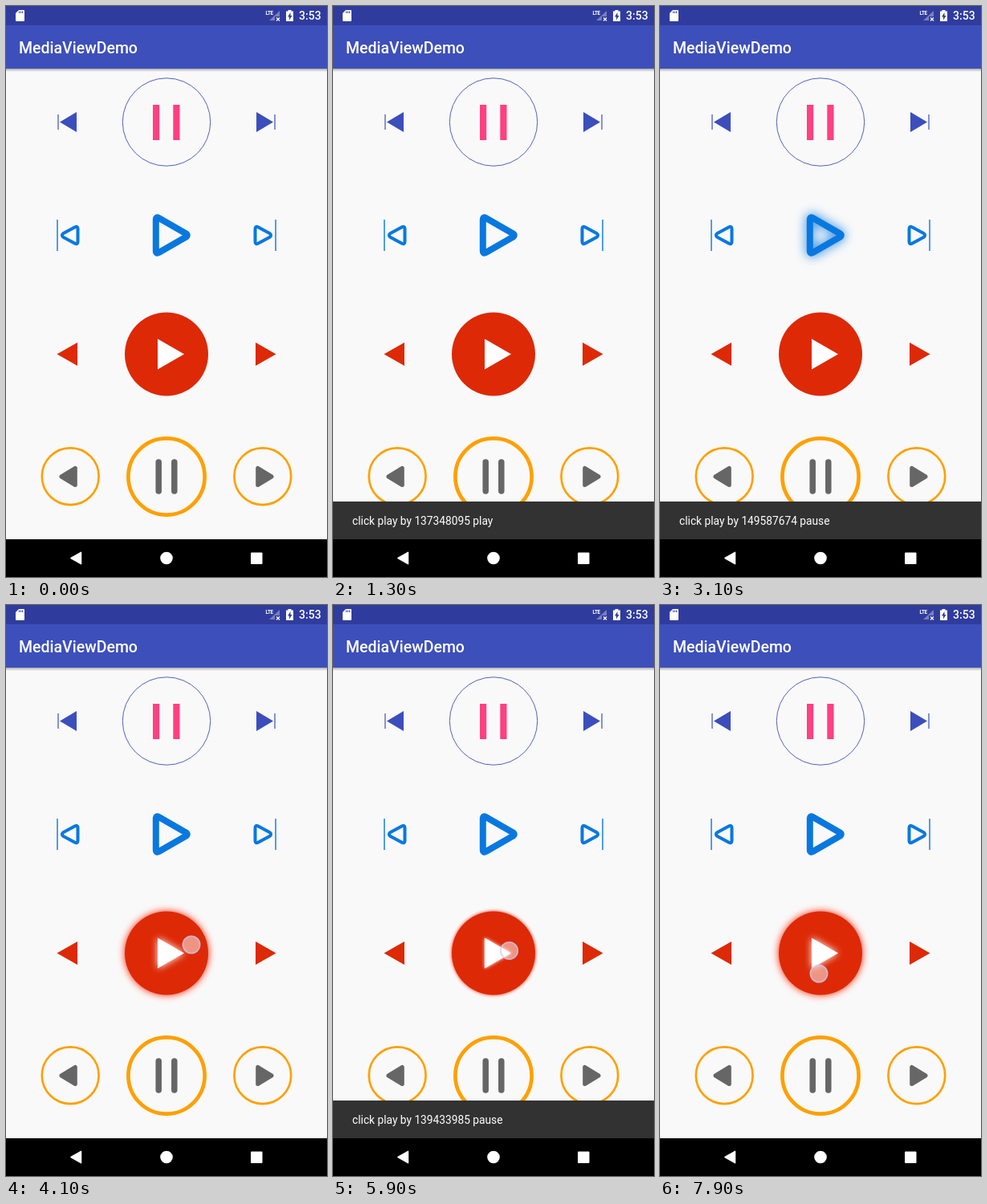
Animation of 400x711 px, one loop 8000 ms. Source, as an HTML page:

```html
<!DOCTYPE html>
<html lang="en">
<head>
<meta charset="utf-8">
<title>MediaViewDemo</title>
<style>
html, body { margin: 0; width: 100%; height: 100%; overflow: hidden; background: #f9f9f9; }
svg { display: block; width: 100vw; height: 100vh; }
text { font-family: Roboto, sans-serif; fill: #fff; }
</style>
</head>
<body>
<svg viewBox="0 0 400 711">
  <defs>
    <linearGradient id="shade" x2="0" y2="1">
      <stop stop-color="#000" stop-opacity=".3"/>
      <stop offset="1" stop-color="#000" stop-opacity="0"/>
    </linearGradient>
    <g id="outlineArrow">
      <path d="M64 266V305" stroke-width="1.4" stroke-linecap="butt"/>
      <path d="M71.200 283.300 86 275.300Q89.500 273.800 89.500 277.500V293.500Q89.500 297.200 86 295.700L71.200 287.700Q68.600 285.500 71.200 283.300Z" stroke-width="4"/>
    </g>
  </defs>
  <rect width="400" height="711" fill="#f9f9f9"/>

  <rect y="24" width="400" height="54" fill="#3d4fba"/>
  <rect width="400" height="24" fill="#303c9d"/>
  <rect y="78" width="400" height="4" fill="url(#shade)"/>
  <text x="16" y="58.5" font-size="19.5" font-weight="500">MediaViewDemo</text>
  <g fill="#fff">
    <path d="M12 9 16 5H22Q23 5 23 6V18Q23 19 22 19H13Q12 19 12 18Z"/>
    <path d="M16.5 6.5V9M18.5 6.5V9M20.5 6.5V9" stroke="#303c9d"/>
    <text x="323.5" y="11" font-size="6.3" font-weight="700" letter-spacing="-.3">LTE</text>
    <path d="M341 6V13H335V18H328Z" fill-opacity=".35"/>
    <path d="M337 14.5 341 18.5M341 14.5 337 18.5" stroke="#fff" stroke-width="1.2"/>
    <path d="M349 6.5H351.5V5H355.5V6.5H358V19H349Z"/>
    <path d="M354.5 8 351 13.5H353V17.5L356.5 12H354.5Z" fill="#303c9d"/>
    <text x="365" y="17.3" font-size="14" font-weight="500">3:53</text>
  </g>

  <g id="top" fill="#ff4081">
    <circle cx="200" cy="144.5" r="54.7" fill="none" stroke="#3f51b5" stroke-width=".9"/>
    <path class="play" d="M189 125V164L222 144.5Z"/>
    <path class="pause" d="M183 123H191.2V167H183ZM208.3 123H216.5V167H208.3Z"/>
  </g>
  <g fill="#3c4ebb">
    <path d="M67 144.5 88 132V157ZM333 144.5 312 132V157Z"/>
    <path d="M65 135V154M335 135V154" stroke="#3c4ebb" stroke-width="1.2"/>
  </g>

  <g fill="none" stroke="#0878e0" stroke-linejoin="round" stroke-linecap="round">
    <use href="#outlineArrow"/>
    <use href="#outlineArrow" transform="matrix(-1 0 0 1 400 0)"/>
    <g id="blue" stroke-width="8">
      <path class="play" d="M186.8 266.5Q186.800 262 190.500 264L224 283.200Q227.500 285.500 224 287.800L190.500 307Q186.800 309 186.800 304.500Z"/>
      <path class="pause" d="M185.700 265V306M214.300 265V306"/>
    </g>
  </g>

  <path d="M63.5 433.5 89 419V448ZM336.5 433.5 311 419V448Z" fill="#dd2906"/>
  <circle id="disc" cx="200" cy="433.5" r="52" fill="#dd2906"/>
  <g id="red" fill="#fff">
    <path class="play" d="M189 414.5V452.5L222 433.5Z"/>
    <path class="pause" d="M186 413H193.5V454H186ZM206.5 413H214V454H206.5Z"/>
  </g>

  <g fill="none" stroke="#ffa000" stroke-width="2.7">
    <circle cx="80.2" cy="585.7" r="35.4"/>
    <circle cx="319.8" cy="585.7" r="35.4"/>
    <circle cx="200" cy="586" r="47.6" stroke-width="4.7"/>
  </g>
  <g fill="#666" stroke="#666" stroke-linejoin="round" stroke-linecap="round">
    <path d="M69 586 86.3 575.5V596.5ZM331 586 313.7 575.5V596.5Z" stroke-width="5"/>
    <path d="M190.2 568V604M209.8 568V604" stroke-width="7.5"/>
  </g>

  <g id="snack">
    <rect y="617" width="400" height="47" fill="#323232"/>
    <text id="message" x="24" y="646" font-size="13.75"></text>
  </g>
  <rect y="664" width="400" height="47" fill="#000"/>
  <g fill="#fff">
    <path d="M81 687.500 93.500 680.300V694.700Z" stroke="#fff" stroke-width="1.500" stroke-linejoin="round"/>
    <circle cx="200" cy="687.5" r="7.8"/>
    <rect x="305" y="680.5" width="14.500" height="14.500" rx="1"/>
  </g>
  <circle id="dot" r="10.7" fill="#fff" fill-opacity=".5" stroke="#c9c9f2" stroke-opacity=".8" stroke-width="1.6"/>
</svg>
<script>
const LOOP = 8000, STEP = 100, SLIDE = 125, SNACK_HEIGHT = 47;
const $ = id => document.getElementById(id);
const clamp = v => Math.max(0, Math.min(1, v));

// glows: [element id, colour]; fade: how long the glow lingers after release
const buttons = {
  top: { playing: true, size: 3, fade: 200, glows: [['top', '#ff4081']] },
  blue: { playing: false, size: 13, fade: 600, glows: [['blue', '#0878e0']] },
  red: { playing: false, size: 5, fade: 300, glows: [['disc', '#ff2000'], ['red', '#fff']] }
};

// path: [time, x, y]
const presses = [
  { name: 'top', down: 250, up: 390, path: [[250, 218, 158]] },
  { name: 'top', down: 880, up: 1020, path: [[880, 218, 158]] },
  { name: 'blue', down: 1800, up: 1960, path: [[1800, 222, 296]] },
  { name: 'blue', down: 2800, up: 2940, path: [[2800, 222, 296]] },
  { name: 'red', down: 3900, up: 4150, path: [[3900, 231, 423]] },
  { name: 'red', down: 5020, up: 5200, path: [[5020, 231, 423]] },
  { name: 'red', down: 5800, up: 9000, path: [[5800, 222, 428], [6300, 210, 440], [6700, 161, 502], [7300, 182, 482], [7900, 198, 459]] }
];

const snacks = [
  [400, 1050, '137348095 pause'],
  [1175, 1890, '137348095 play'],
  [2018, 2870, '149587674 play'],
  [2990, 3860, '149587674 pause'],
  [4190, 5065, '139433985 play'],
  [5254, 6130, '139433985 pause']
];

// cubic-bezier(.4, 0, .2, 1)
function ease(x) {
  let lo = 0, hi = 1, s = .5;
  for (let i = 0; i < 16; i++) {
    s = (lo + hi) / 2;
    const r = 1 - s;
    if (1.2 * r * r * s + .6 * r * s * s + s ** 3 < x) lo = s; else hi = s;
  }
  return s * s * (3 - 2 * s);
}

function along(path, t) {
  const next = path.findIndex(p => p[0] > t);
  if (next < 1) return path[next ? path.length - 1 : 0].slice(1);
  const a = path[next - 1], b = path[next];
  const k = (t - a[0]) / (b[0] - a[0]);
  return [1, 2].map(i => a[i] + (b[i] - a[i]) * k);
}

const strength = (press, t, fade) =>
  clamp((t - press.down) / 150) * clamp(1 - (t - press.up) / fade);

function drawButton(name, t) {
  const { playing, size, fade, glows } = buttons[name];
  const own = presses.filter(p => p.name === name);
  const clicks = own.filter(p => t >= p.up).length;
  const showPause = playing !== (clicks % 2 === 1);
  $(name).querySelector('.pause').style.display = showPause ? '' : 'none';
  $(name).querySelector('.play').style.display = showPause ? 'none' : '';
  const level = Math.max(...own.map(p => strength(p, t, fade))) ** 2;
  for (const [id, colour] of glows) {
    $(id).style.filter = level > .01 ? `drop-shadow(0 0 ${size * level}px ${colour})` : 'none';
  }
}

function drawSnack(t) {
  const snack = snacks.find(([start, end]) => t >= start && t < end + SLIDE);
  $('snack').style.display = snack ? '' : 'none';
  if (!snack) return;
  const [start, end, text] = snack;
  const shown = t < end ? ease(clamp((t - start) / SLIDE)) : 1 - ease((t - end) / SLIDE);
  $('snack').setAttribute('transform', `translate(0 ${Math.round(SNACK_HEIGHT * (1 - shown))})`);
  $('message').textContent = 'click play by ' + text;
}

function drawDot(t) {
  const press = presses.find(p => t >= p.down && t < p.up + 140);
  $('dot').style.opacity = press ? clamp(1 - (t - press.up) / 140) : 0;
  if (press) $('dot').setAttribute('transform', `translate(${along(press.path, t)})`);
}

const origin = performance.now();
function render() {
  const elapsed = (performance.now() - origin) % LOOP;
  const t = Math.floor(elapsed / STEP) * STEP;
  Object.keys(buttons).forEach(name => drawButton(name, t));
  drawSnack(t);
  drawDot(t);
  requestAnimationFrame(render);
}
render();
</script>
</body>
</html>
```
